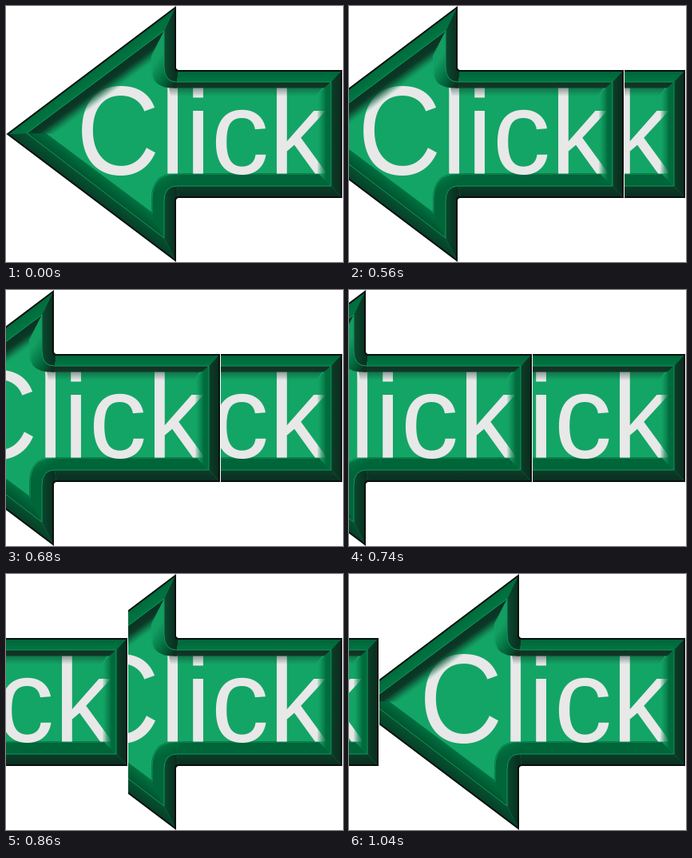
These frames come from a looping animation (422 by 320 pixels, 1100 ms). An HTML page with a canvas:

```html
<!DOCTYPE html>
<html>
<head>
<meta charset="utf-8">
<style>
html, body { margin: 0; width: 100%; height: 100%; overflow: hidden; background: #fff; }
canvas { display: block; }
</style>
</head>
<body>
<canvas id="stage" width="422" height="320"></canvas>
<script>
const W = 422, H = 320, HOLD = 500, STEP = 60, LOOP = 1100;
const stage = document.getElementById('stage').getContext('2d');
const sprite = Object.assign(document.createElement('canvas'), { width: W, height: H });
const g = sprite.getContext('2d');

const OUTLINE = 'M2 160L212 2V77Q212 81 216 81H420V239H216Q212 239 212 243V318Z';
const RIDGE = 'M26 159L198 31V76Q198 95 214 95H407V225H214Q198 225 198 244V290Z';

// Fills a path with a linear gradient running from (x0,y0) to (x1,y1).
function face(d, [x0, y0, x1, y1], ...colors) {
  const fill = g.createLinearGradient(x0, y0, x1, y1);
  colors.forEach((c, i) => fill.addColorStop(i / Math.max(1, colors.length - 1), c));
  g.fillStyle = fill;
  g.fill(new Path2D(d));
}

function line(d, color, width) {
  g.strokeStyle = color;
  g.lineWidth = width;
  g.stroke(new Path2D(d));
}

// Slightly condensed lettering on a common baseline.
function label(text, x, size, width) {
  g.save();
  g.translate(x, 210);
  g.scale(width / size, 1);
  g.font = `${size}px "Liberation Sans", Arial, sans-serif`;
  g.fillStyle = '#e8e8e8';
  g.fillText(text, 0, 0);
  g.restore();
}

function drawButton() {
  g.fillStyle = '#13a566';
  g.fill(new Path2D(OUTLINE));

  // Inner slopes below the lettering
  face('M26 159L198 290L183 258L50 159Z', [112, 224, 125, 207],
    '#00552f', '#006238', '#00703f', '#0b8b54');
  face('M198 290V244Q198 225 214 225H407L391 209H212Q182 209 182 242V260Z', [190, 208, 200, 226],
    '#17a868', '#007a45', '#006d3d', '#006539');
  line('M183 260V242Q183 210 212 210H391', '#1bab6eb0', 1);

  label('C', 87.7, 157, 145);
  label('lick', 192.4, 149, 145);

  // Inner slopes over the lettering
  face('M26 159L198 31L183 85L62 160Z', [112, 95, 126, 114],
    '#0a3524', '#0a3524', '#0b3b28', '#0c5034c0', '#0d6b4360', '#13a56600');
  face('M204 102H396L388 113H206Z', [0, 102, 0, 113], '#0a302070', '#0a302000');
  face('M210 95H407L399 102.5H210Z', [0, 95, 0, 102], '#10301f', '#12382a');
  face('M407 95V225L390 209V110Z', [389, 0, 407, 0],
    '#13a56600', '#0a8450a0', '#006b3c', '#006b3c');
  face('M198 31V76Q198 95 214 95V102.5Q182 104 182 80V62Z', [181, 80, 210, 100],
    '#129d61', '#07804c', '#006038', '#10301f');
  line('M183 62V80Q183 98 196 101', '#1bab6e90', 1);

  // Outer slopes
  face('M2 160L212 2L198 31L26 159Z', [107, 81, 116, 93], '#006a3b', '#007643');
  face('M2 160L212 318L198 290L26 159Z', [107, 239, 116, 227], '#05402a', '#06522f');
  face('M212 2V77L216 81L214 95Q198 95 198 76V31Z', [198, 0, 212, 0], '#0b4a30', '#0a3020');
  face('M216 81H420L407 95H214Z', [0, 81, 0, 95], '#006439', '#007643');
  face('M420 81V239L407 225V95Z', [407, 0, 420, 0], '#0b3d28', '#0a2c1e');
  face('M420 239H216L214 225H407Z', [0, 225, 0, 239], '#0c3d29', '#0a2e20');
  face('M212 318V243L216 239L214 225Q198 225 198 244V290Z', [198, 0, 212, 0], '#08482d', '#0a3021');

  line(RIDGE, '#12935b', 1);
  line(OUTLINE, '#0b0f0d', 2);
}

function render(now) {
  const t = now % LOOP;
  const step = t < HOLD ? 0 : Math.floor((t - HOLD) / STEP) + 1;
  const shift = Math.round(W * step / 11);
  const edge = W - shift;
  stage.fillStyle = '#fff';
  stage.fillRect(0, 0, W, H);
  stage.drawImage(sprite, -shift, 0);
  if (shift) stage.drawImage(sprite, edge, 0, shift, H, edge, 0, shift, H);
  requestAnimationFrame(render);
}

drawButton();
requestAnimationFrame(render);
</script>
</body>
</html>
```
